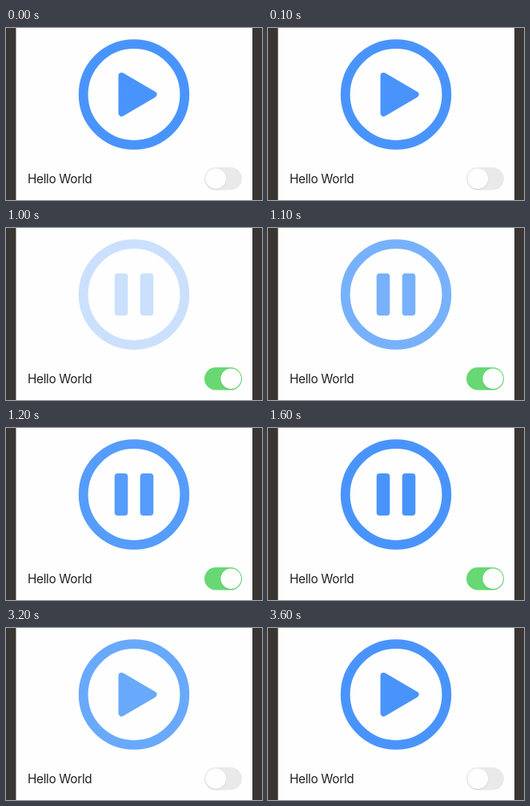
Recreate the animation shown at these times as an HTML page. Size 320 px wide and 216 px high, loop 8 s.

```html
<!DOCTYPE html>
<html lang="en">
<head>
<meta charset="utf-8">
<title>Play toggle</title>
<style>
  html, body { margin: 0; height: 100%; overflow: hidden; background: #383532; }
  svg { display: block; width: 100vw; height: 100vh; }
  text { font: 15.3px Inter, sans-serif; letter-spacing: -0.3px; fill: #202022; }

  .icon, .play, .pause, .track, .knob { animation: 8s step-end infinite; }
  .icon { color: #4994fc; animation-name: fade; }
  .play { animation-name: while-off; }
  .pause { animation-name: while-on; }
  .track { animation-name: tint; }
  .knob { animation-name: slide; }

  /* On at 1 s, off at 3.1 s; the icon fades in after each switch. */
  @keyframes fade {
    0% { color: #4994fc; }
    12.5% { color: #cbe0fd; }
    13.75% { color: #78b1fb; }
    15% { color: #559cfc; }
    16.25% { color: #4994fc; }
    38.75% { color: #b0d3fb; }
    40% { color: #69a9fb; }
    41.25% { color: #4f98fc; }
    42.5% { color: #4994fc; }
  }
  @keyframes while-off {
    0%, 38.75% { visibility: visible; }
    12.5% { visibility: hidden; }
  }
  @keyframes while-on {
    0%, 38.75% { visibility: hidden; }
    12.5% { visibility: visible; }
  }
  @keyframes tint {
    0%, 38.75% { fill: #e9e9e9; }
    12.5% { fill: #67d873; }
  }
  @keyframes slide {
    0%, 38.75% { transform: translateX(0); }
    12.5% { transform: translateX(19px); }
  }
</style>
</head>
<body>
<svg viewBox="0 0 320 216" preserveAspectRatio="none">
  <rect width="320" height="216" fill="#383532"/>
  <rect x="12.5" width="295.5" height="216" fill="#fefefe"/>
  <g class="icon" fill="currentColor" stroke="currentColor" stroke-linejoin="round">
    <circle cx="160" cy="83.5" r="63.3" fill="none" stroke-width="11.8"/>
    <path class="play" d="M144.5 60 184.5 83.5 144.5 107Z" stroke-width="8"/>
    <g class="pause" stroke="none">
      <rect x="135.7" y="57" width="16.6" height="53" rx="4"/>
      <rect x="167.7" y="57" width="16.6" height="53" rx="4"/>
    </g>
  </g>
  <text x="27" y="195">Hello World</text>
  <rect class="track" x="248" y="175" width="47" height="28.5" rx="14.25"/>
  <g class="knob">
    <circle cx="262.2" cy="190" r="13.3" fill="#000" opacity=".07"/>
    <circle cx="262.2" cy="189.2" r="12.8" fill="#fefefe"/>
  </g>
</svg>
</body>
</html>
```
